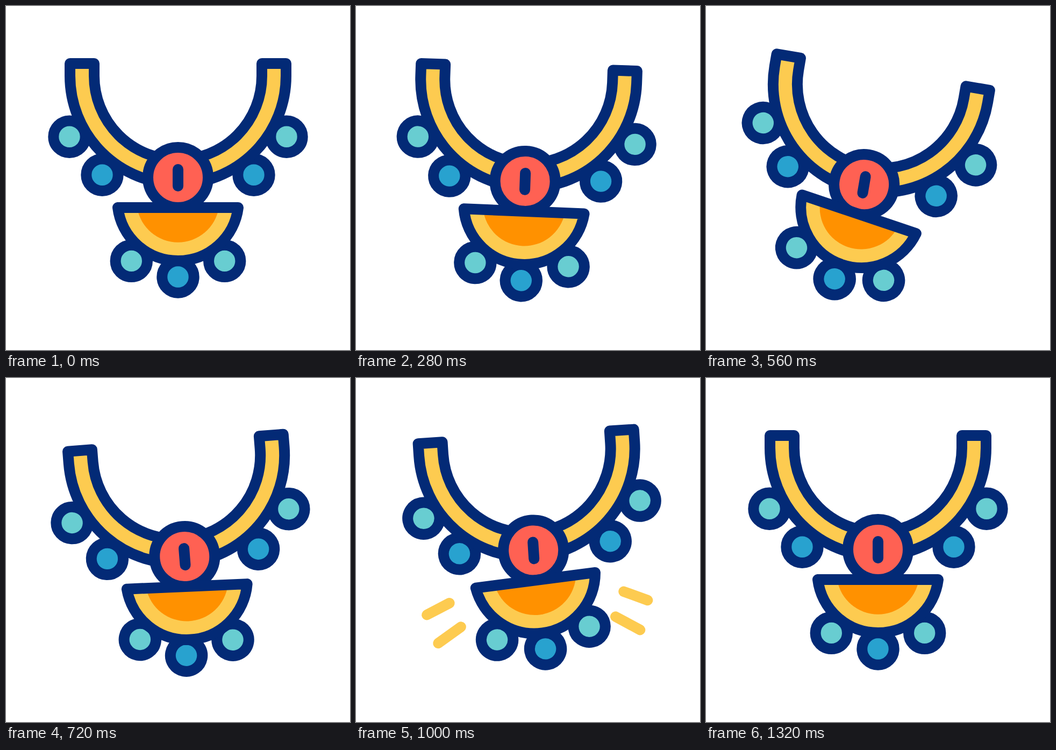
Animation, 640 px wide and 640 px high, one loop 1440 ms. Source, as an HTML page:

```html
<!DOCTYPE html>
<html lang="en">
<head>
<meta charset="utf-8">
<title>Necklace</title>
<style>
  html, body { margin: 0; width: 100%; height: 100%; overflow: hidden; background: #fff; }
  svg { display: block; width: 100%; height: 100%; }
  .line { stroke: #032a76; stroke-width: 20; stroke-linejoin: round; stroke-linecap: round; }
  .gold { fill: #fdcb50; }
  .red { fill: #ff6153; }
  .orange { fill: #ff9100; }
  .teal { fill: #68cdd1; }
  .blue { fill: #28a2cf; }
  .ray { stroke: #fdcb50; stroke-width: 19.5; stroke-linecap: round; }
</style>
</head>
<body>
<svg viewBox="0 0 640 640">
  <g id="necklace">
    <g id="rays"></g>
    <g id="collarBeads"></g>
    <path class="line gold" d="M119 107H164V130A156 156 0 0 0 476 130V107H521V130A201 201 0 0 1 119 130Z"/>
    <circle class="line red" cx="320" cy="319" r="56"/>
    <path class="line" d="M320 304V335"/>
    <g id="pendant">
      <g id="pendantBeads"></g>
      <path class="gold" d="M208 375H432A112.85 112.85 0 0 1 208 375Z"/>
      <path class="orange" d="M244 375H396A77 77 0 0 1 244 375Z"/>
      <path class="line" fill="none" d="M208 375H432A112.85 112.85 0 0 1 208 375Z"/>
    </g>
  </g>
</svg>
<script>
const LOOP = 1440, STEP = 40;
const NECK = [320, 165], HOOK = [320, 375];
const CENTER_X = 320, BEAD_ARM = 29;
const arcCenterY = { collarBeads: 130, pendantBeads: 361 };

// Each track is a list of [time, value], eased between neighbours.
const tracks = {
  drop: [[45, 0], [540, 15.3], [595, 15.3], [1125, 0]],
  swing: [[166, 0], [533, 10], [830, -10.4], [1123, 0]],
  collarBeads: [[250, 0], [620, 13], [900, -9], [1250, 0]],
  pendant: [[230, 0], [575, 9], [880, -6], [1150, 0]],
  pendantBeads: [[380, 0], [680, 14], [960, -4.5], [1300, 0]],
  rayHead: [[771, 0], [1200, 1]],
  rayTail: [[823, 0], [1310, 1]]
};

// Inner and outer end of each ray, measured from the neck pivot.
const rayPaths = [
  [120.2, 223.2, 273.6, 290.8],
  [101.3, 260.6, 257, 358]
];

const $ = id => document.getElementById(id);

function add(parent, tag, attrs) {
  const el = document.createElementNS("http://www.w3.org/2000/svg", tag);
  for (const key in attrs) el.setAttribute(key, attrs[key]);
  return parent.appendChild(el);
}

// A bead hangs from a point a short way towards the centre of its arc.
const beads = [];
function bead(group, cx, cy, color) {
  const dx = CENTER_X - cx, dy = arcCenterY[group] - cy;
  const k = BEAD_ARM / Math.hypot(dx, dy);
  const el = add($(group), "circle", { cx, cy, r: 29.7, class: "line " + color });
  beads.push({ el, group, pivot: [cx + dx * k, cy + dy * k] });
}

const rays = [];
for (const side of [-1, 1]) {
  bead("collarBeads", CENTER_X + side * 202, 243.3, "teal");
  bead("collarBeads", CENTER_X + side * 141, 314.2, "blue");
  bead("pendantBeads", CENTER_X + side * 86.7, 474.4, "teal");
  for (const path of rayPaths)
    rays.push({ side, path, el: add($("rays"), "line", { class: "ray" }) });
}
bead("pendantBeads", CENTER_X, 504, "blue");

// Cubic ease in and out, control points (.42, 0) and (.58, 1).
function ease(x) {
  let lo = 0, hi = 1, s = 0.5;
  for (let i = 0; i < 20; i++) {
    s = (lo + hi) / 2;
    const bx = 1.26 * s * (1 - s) ** 2 + 1.74 * s * s * (1 - s) + s ** 3;
    if (bx < x) lo = s; else hi = s;
  }
  return s * s * (3 - 2 * s);
}

function valueAt(name, t) {
  const keys = tracks[name];
  if (t <= keys[0][0]) return keys[0][1];
  for (let i = 1; i < keys.length; i++) {
    const [t0, a] = keys[i - 1], [t1, b] = keys[i];
    if (t < t1) return a + (b - a) * ease((t - t0) / (t1 - t0));
  }
  return keys[keys.length - 1][1];
}

function rotate(el, angle, pivot, dy = 0) {
  el.setAttribute("transform", `translate(0 ${dy}) rotate(${angle} ${pivot})`);
}

function drawRays(head, tail) {
  const shown = head - tail > 0.004;
  for (const { side, path: [x0, y0, x1, y1], el } of rays) {
    el.style.display = shown ? "" : "none";
    [tail, head].forEach((p, i) => {
      el.setAttribute("x" + (i + 1), NECK[0] + side * (x0 + (x1 - x0) * p));
      el.setAttribute("y" + (i + 1), NECK[1] + y0 + (y1 - y0) * p);
    });
  }
}

function draw(t) {
  rotate($("necklace"), valueAt("swing", t), NECK, valueAt("drop", t));
  rotate($("pendant"), valueAt("pendant", t), HOOK);
  for (const { el, group, pivot } of beads) rotate(el, valueAt(group, t), pivot);
  drawRays(valueAt("rayHead", t), valueAt("rayTail", t));
}

const start = performance.now();
function tick() {
  const t = (performance.now() - start) % LOOP;
  draw(Math.floor(t / STEP) * STEP);
  requestAnimationFrame(tick);
}
tick();
</script>
</body>
</html>
```
